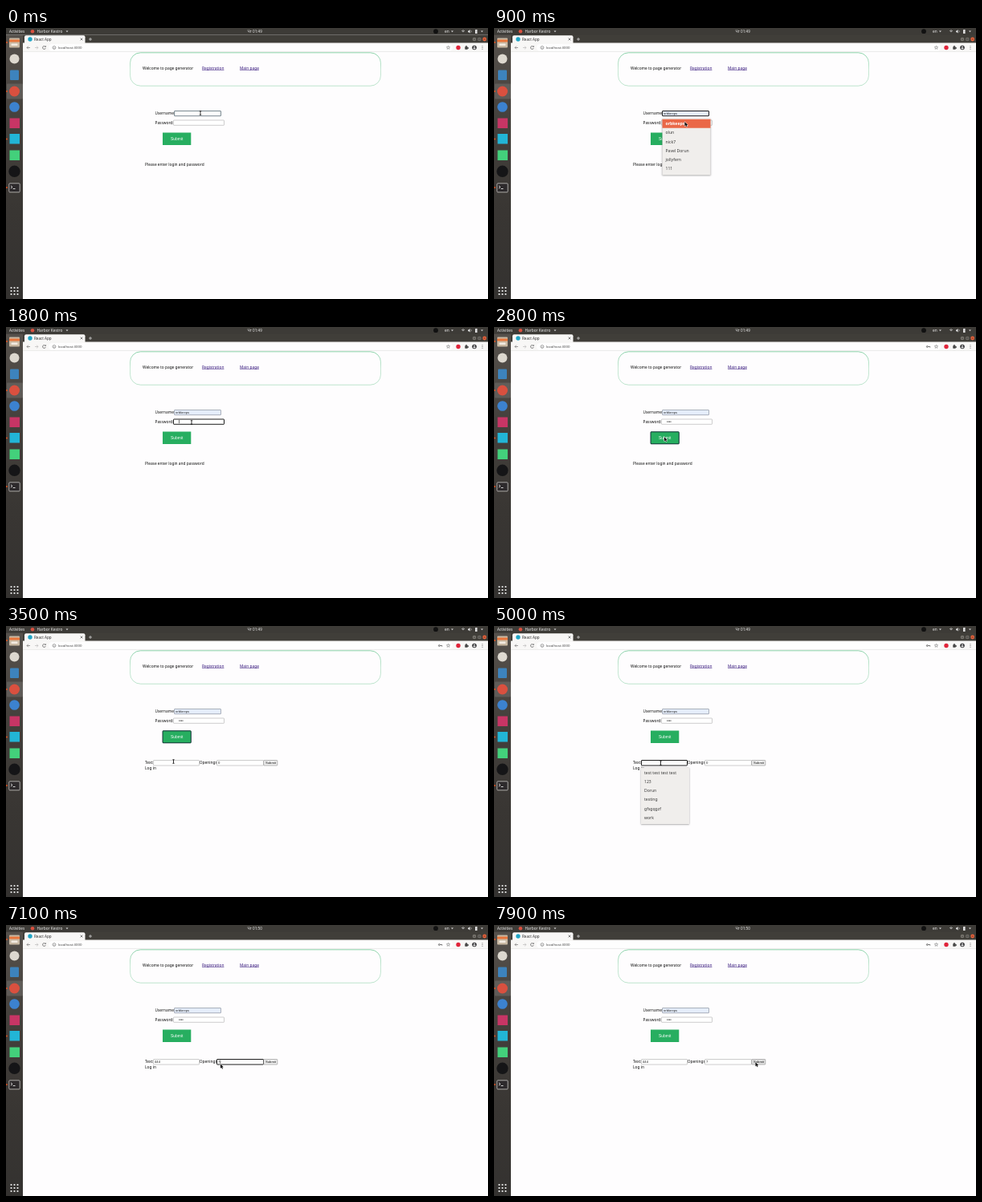
Recreate the animation shown at these times as an HTML page with a canvas. Size 600 by 338 pixels, loop 8 s.

```html
<!DOCTYPE html>
<html lang="en">
<head>
<meta charset="utf-8">
<title>Login form demo</title>
<style>
  html, body { margin: 0; width: 100%; height: 100%; overflow: hidden; background: #fff; }
  canvas { display: block; width: 600px; height: 338px; }
</style>
</head>
<body>
<canvas id="stage" width="600" height="338"></canvas>
<script>
const ctx = document.getElementById('stage').getContext('2d');
const LOOP = 8000, STEP = 100;
const SANS = '"Noto Sans", sans-serif', ARIAL = '"Liberation Sans", Arial, sans-serif';
const INK = '#111', GREEN = '#27ae60', PANEL = '#3d3b37', TOOLBAR = '#f8f7f6';

const USERS = ['orbkeeps', 'olun', 'nick7', 'Pavel Dorun', 'jollyfern', '111'];
const TEXTS = ['test test test test', '123', 'Dorun', 'testing', 'gfsgqgzf', 'work'];

// Pointer path: time, x, y
const PATH = [
  [0, 242, 106], [300, 242, 106], [700, 238, 119], [1100, 238, 119], [1500, 231, 119],
  [2200, 231, 119], [2700, 212, 139], [2900, 213, 139], [3100, 226, 138], [3500, 208.5, 169],
  [3700, 208, 170], [3800, 208, 170], [3900, 207.5, 171], [5800, 207.5, 171], [6000, 245, 176],
  [6200, 278, 171], [6400, 278, 171], [6700, 256, 176], [7000, 256, 176], [7600, 325, 172],
  [7700, 326, 173], [8000, 326, 173]
];
const BOX = {
  user: [209.5, 103.5, 58, 6.2],
  pass: [208.5, 115, 63, 6.3],
  text: [183.5, 167.5, 57, 6.5],
  open: [262.5, 167.5, 58, 6.5]
};

function rect(x, y, w, h, color, radius = 0) {
  ctx.fillStyle = color;
  ctx.beginPath();
  ctx.roundRect(x, y, w, h, radius);
  ctx.fill();
}
function frame(x, y, w, h, color, width = 1, radius = 0) {
  ctx.strokeStyle = color;
  ctx.lineWidth = width;
  ctx.beginPath();
  ctx.roundRect(x, y, w, h, radius);
  ctx.stroke();
}
function disc(x, y, r, color) {
  ctx.fillStyle = color;
  ctx.beginPath();
  ctx.arc(x, y, r, 0, 7);
  ctx.fill();
}
function ring(x, y, r, color, width = 0.7, from = 0, to = 7) {
  ctx.strokeStyle = color;
  ctx.lineWidth = width;
  ctx.beginPath();
  ctx.arc(x, y, r, from, to);
  ctx.stroke();
}
function line(points, color, width = 0.7) {
  ctx.strokeStyle = color;
  ctx.lineWidth = width;
  ctx.beginPath();
  points.forEach(p => ctx.lineTo(...p));
  ctx.stroke();
}
function shape(points, color) {
  ctx.fillStyle = color;
  ctx.beginPath();
  points.forEach(p => ctx.lineTo(...p));
  ctx.fill();
}
function fade(y0, y1, ...colors) {
  const gradient = ctx.createLinearGradient(0, y0, 0, y1);
  colors.forEach((c, i) => gradient.addColorStop(i / (colors.length - 1), c));
  return gradient;
}
// Laid out at ten times the size so that small text keeps exact spacing; y is the middle.
function text(s, x, y, size = 4.82, color = INK, weight = 400, family = SANS) {
  ctx.save();
  ctx.translate(x, y + size * 0.35);
  ctx.scale(0.1, 0.1);
  ctx.font = `${weight} ${size * 10}px ${family}`;
  ctx.fillStyle = color;
  ctx.fillText(s, 0, 0);
  const width = ctx.measureText(s).width / 10;
  ctx.restore();
  return width;
}
function link(s, x, y) {
  const w = text(s, x, y, 4.82, '#35167c');
  line([[x, y + 2.5], [x + w, y + 2.5]], '#35167c', 0.5);
}
const caretDown = (x, y) => shape([[x - 1.5, y - 0.7], [x + 1.5, y - 0.7], [x, y + 1]], '#ddd');

function topBar(t) {
  rect(0, 0, 600, 8.5, PANEL);
  text('Activities', 4, 4.2, 4.6, '#eee', 500);
  disc(33, 4.2, 2.3, '#d9503f');
  text('Harbor Kestro', 38.5, 4.2, 4.8, '#eee', 500);
  caretDown(76, 4.3);
  text(t < 5600 ? 'Чт 01:49' : 'Чт 01:50', 300.5, 4.2, 4.6, '#eee', 500);
  disc(535, 4.2, 2.9, '#111');
  text('en', 546, 4.2, 4.8, '#eee', 500);
  caretDown(555.5, 4.3);
  for (const r of [1.2, 2.6]) ring(569, 5.6, r, '#ddd', 0.8, -2.3, -0.8);
  shape([[575, 3.4], [576, 3.4], [577.6, 2], [577.6, 6.6], [576, 5.2], [575, 5.2]], '#ddd');
  ring(577.8, 4.3, 1.6, '#ddd', 0.5, -0.9, 0.9);
  rect(584, 2, 2.6, 5, '#ddd', 0.5);
  caretDown(592.5, 4.3);
}

function sidebar() {
  rect(0, 8.5, 21, 329.5, fade(8, 338, '#56514c', '#44403c', '#393633', '#343230'));
  rect(1, 69.5, 20, 19, 'rgba(255,255,255,.12)', 1);
  rect(4, 12.5, 13, 12, '#c9b9a3', 1);
  rect(4, 14.5, 13, 3, '#e8763c');
  rect(6.5, 19.5, 8, 2.5, '#f3ece2', 0.5);
  disc(10.5, 38.5, 6, '#ddd8cf');
  rect(5, 52.5, 11, 12.5, '#3d83bd', 1);
  disc(10.5, 79, 6.5, '#d9503f');
  disc(10.5, 98.5, 6.3, '#3c82cf');
  rect(4.5, 112.5, 12.5, 12.5, '#c73565');
  rect(4.5, 132, 12.5, 12.5, '#22b5d6');
  rect(4.5, 152.5, 12.5, 12.5, '#43d07b');
  disc(10.5, 178.8, 7.2, '#151517');
  rect(3.5, 193.5, 14, 11.5, '#2d2a2c', 1);
  frame(3.8, 193.8, 13.4, 11, '#c9c7c4', 0.8, 1);
  line([[6, 196.8], [8, 198.4], [6, 200]], '#fff', 0.8);
  line([[8.7, 200.5], [11.5, 200.5]], '#fff', 0.8);
  for (const y of [18, 79, 138.5, 199]) disc(1, y, 0.9, '#e95420');
  for (let i = 0; i < 9; i++) disc(6.5 + i % 3 * 4, 324 + Math.floor(i / 3) * 4, 1.1, '#eee');
}

function browser(t) {
  rect(21, 8.5, 579, 11, '#403e39');
  rect(23, 9.2, 75.5, 11, TOOLBAR, [2, 2, 0, 0]);
  disc(30, 14, 2.7, '#20a5c5');
  text('React App', 35, 14, 4.6, '#333');
  line([[92.6, 12.6], [95.4, 15.4]], '#555');
  line([[95.4, 12.6], [92.6, 15.4]], '#555');
  line([[103, 14], [107, 14]], '#ddd');
  line([[105, 12], [105, 16]], '#ddd');
  disc(583, 14, 2.3, '#77746d');
  line([[582, 14.2], [584, 14.2]], '#333', 0.6);
  disc(589.3, 14, 2.3, '#77746d');
  frame(588.4, 13.1, 1.8, 1.8, '#333', 0.5);
  disc(595.7, 14, 2.4, '#e9633a');
  line([[594.8, 13.1], [596.6, 14.9]], '#522', 0.5);
  line([[596.6, 13.1], [594.8, 14.9]], '#522', 0.5);

  rect(21, 18.5, 579, 11.5, TOOLBAR);
  rect(53, 20.1, 503, 8.6, '#fefefe', 4.3);
  for (const [x, dir, color] of [[28, -1, '#777'], [38, 1, '#bbb']]) {
    line([[x - 2, 24.5], [x + 2, 24.5]], color);
    line([[x + dir * 0.2, 22.7], [x + dir * 2, 24.5], [x + dir * 0.2, 26.3]], color);
  }
  ring(47.5, 24.5, 1.9, '#555', 0.7, 0.3, 5.4);
  shape([[48, 23.8], [49.8, 23.8], [49.8, 22]], '#555');
  ring(60, 24.5, 1.9, '#666', 0.6);
  line([[60, 24.2], [60, 25.6]], '#666', 0.6);
  text('localhost:3000', 65, 24.5, 4.35, '#444');
  if (t >= 2100) {
    ring(539.3, 24.5, 0.9, '#555', 0.8);
    line([[540.2, 24.5], [542.8, 24.5], [542.8, 25.6]], '#555', 0.8);
  }
  const star = Array.from({ length: 11 }, (_, i) => {
    const r = i % 2 ? 1 : 2.3, a = i * Math.PI / 5;
    return [550.5 + r * Math.sin(a), 24.5 - r * Math.cos(a)];
  });
  line(star, '#666', 0.5);
  disc(563, 24.5, 2.7, '#e0243a');
  rect(571.3, 23.3, 3.4, 3.4, '#444', 0.4);
  disc(573, 23, 0.9, '#444');
  disc(575, 25, 0.9, '#444');
  disc(583, 24.5, 2.8, '#3a3a3c');
  disc(583, 23.7, 0.9, '#eee');
  rect(581.5, 25, 3, 1.2, '#eee', 0.6);
  for (const y of [22.8, 24.5, 26.2]) disc(593, y, 0.5, '#555');
  rect(21, 29.6, 579, 0.5, '#e2e2e2');
}

function field(box, { value = '', focus = false, fill = '#fff', border = '#b8b8b8', pad = 1.5 } = {}) {
  const [x, y, w, h] = box;
  rect(x, y, w, h, fill);
  frame(x, y, w, h, focus ? '#111' : border, focus ? 0.95 : 0.7, 0.5);
  return x + pad + text(value, x + pad, y + h / 2, 4.17, '#222', 400, ARIAL);
}
const caret = (x, y) => line([[x + 0.5, y - 2.2], [x + 0.5, y + 2.2]], '#111', 0.6);

function menu(x, y, items, active = -1) {
  ctx.save();
  ctx.shadowColor = 'rgba(0,0,0,.45)';
  ctx.shadowBlur = 2;
  ctx.shadowOffsetY = 0.6;
  rect(x, y, 60, 70.5, '#f0eeec', 0.5);
  ctx.restore();
  items.forEach((item, i) => {
    const mid = y + 6.3 + i * 11.25, on = i === active;
    if (on) rect(x, mid - 5.5, 60, 11, '#ea6848');
    text(item, x + 4, mid, 5.1, on ? '#fff' : '#3a3a3a', on ? 600 : 500);
  });
}

function page(t) {
  rect(21, 30, 579, 308, '#fefdfe');
  frame(154.5, 30.8, 312, 41.4, fade(31, 72, '#3fb672', '#a3dab9', '#8fd2aa'), 0.6, 13);
  text('Welcome to page generator', 170, 50);
  link('Registration', 244, 50);
  link('Main page', 291, 50);

  text('Username:', 185.5, 106.7);
  field(BOX.user, {
    value: t >= 600 ? USERS[0] : '',
    focus: t >= 200 && t < 1500,
    fill: t >= 600 ? '#e5edfb' : '#fff',
    border: t < 200 ? '#3f5560' : '#8b93a0'
  });

  text('Password:', 185.5, 118);
  const passFocus = t >= 1500 && t < 2700;
  field(BOX.pass, { focus: passFocus });
  const typed = t < 1900 ? 0 : Math.min(4, 2 + (t - 1900) / 100);
  for (let i = 0; i < typed; i++) disc(215.8 + i * 1.4, 118.1, 0.6, '#222');
  if (passFocus) caret(215 + typed * 1.4, 118);

  rect(195, 130.6, 35.3, 15.4, GREEN);
  if (t >= 2700 && t < 4100) frame(195, 130.8, 35.3, 15, '#123', 0.9, 0.8);
  text('Submit', 205, 138.2, 4.9, '#fff', 400, ARIAL);

  if (t < 2900) text('Please enter login and password', 173, 170.6);
  else orderForm(t);

  if (t >= 200 && t < 1100) menu(209.5, 113, USERS, t >= 600 ? 0 : -1);
  if (t >= 5000 && t < 5300) menu(183, 176.5, TEXTS);
}

function orderForm(t) {
  text('Text:', 173, 170.6);
  text('Log in', 173, 177.3);
  text('Openings:', 240.8, 170.6);
  const digits = t < 5300 ? 0 : Math.min(3, 1 + Math.floor((t - 5300) / 200));
  const textFocus = t >= 4100 && t < 6100, openFocus = t >= 6100 && t < 7900;
  const textEnd = field(BOX.text, { value: '4'.repeat(digits), focus: textFocus });
  if (textFocus && digits) caret(textEnd, 170.8);

  const selected = t >= 6700 && t < 7000;
  const openEnd = field(BOX.open, { value: t < 7000 ? '0' : '7', focus: openFocus });
  if (selected) {
    rect(263.8, 168.6, 2.6, 4.4, '#e95420');
    text('0', 264, 170.75, 4.17, '#fff', 400, ARIAL);
  } else if (openFocus) caret(openEnd, 170.8);

  rect(320.8, 167.5, 17, 6.5, t >= 7900 ? '#e2e2e2' : '#efefef', 0.6);
  frame(320.8, 167.5, 17, 6.5, '#8a8a8a', 0.6, 0.6);
  text('Submit', 323, 170.9, 4.17, '#111', 400, ARIAL);
}

function pointer(t) {
  const i = PATH.findIndex(p => p[0] > t);
  const [t0, x0, y0] = PATH[i - 1], [t1, x1, y1] = PATH[i];
  const k = (t - t0) / (t1 - t0);
  const x = x0 + (x1 - x0) * k, y = y0 + (y1 - y0) * k;
  const fields = [BOX.user];
  if (t < 200 || t >= 1100) fields.push(BOX.pass);
  if (t >= 2900) fields.push(BOX.text, BOX.open);
  const overField = fields.some(([fx, fy, w, h]) => x >= fx && x <= fx + w && y >= fy && y <= fy + h);
  if (overField) {
    line([[x, y - 2.3], [x, y + 2.3]], '#000', 0.8);
    for (const dy of [-2.3, 2.3]) line([[x - 1.2, y + dy], [x + 1.2, y + dy]], '#000', 0.7);
  } else {
    const arrow = [[0, -2], [0, 3.4], [1.3, 2.3], [2.2, 4.2], [3.1, 3.8], [2.3, 2], [3.9, 1.9], [0, -2]]
      .map(([dx, dy]) => [x - 0.6 + dx, y + dy]);
    line(arrow, '#fff', 1);
    shape(arrow, '#111');
  }
}

function draw(now) {
  const t = Math.floor(now % LOOP / STEP) * STEP;
  page(t);
  browser(t);
  sidebar();
  topBar(t);
  pointer(t);
  requestAnimationFrame(draw);
}
requestAnimationFrame(draw);
</script>
</body>
</html>
```
